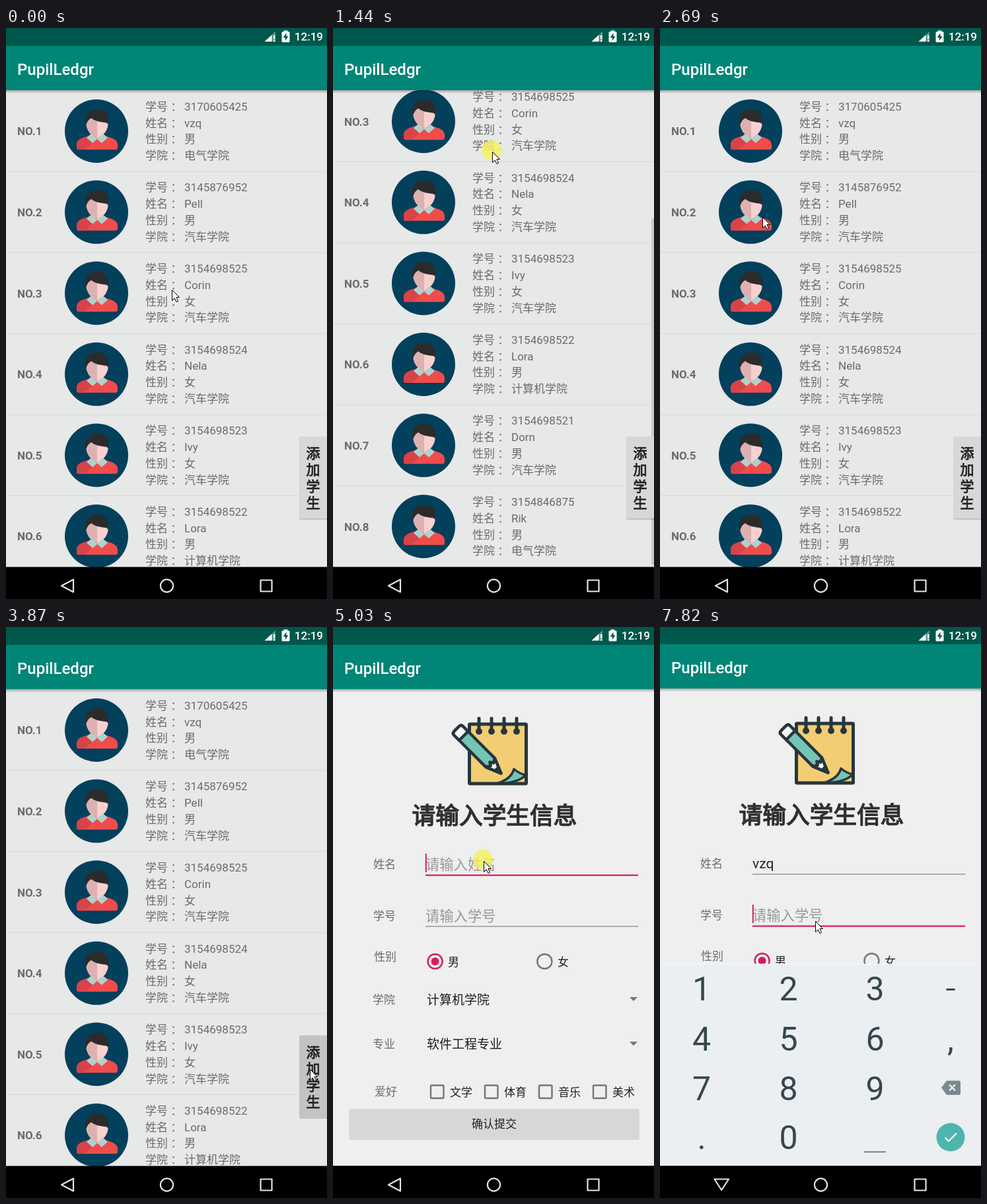
Animation of 486 by 864 pixels, one loop 8 s. Source, as an HTML page:

```html
<!DOCTYPE html>
<html lang="zh-CN">
<head>
<meta charset="utf-8">
<title>PupilLedgr</title>
<style>
html, body { margin: 0; width: 100%; height: 100%; overflow: hidden; background: #000; }
svg { display: block; width: 486px; height: 864px; }
text { font-family: Roboto, 'Noto Sans CJK SC', 'Noto Sans CJK', sans-serif; font-size: 17px; fill: #6b6b6b; white-space: pre; }
.mid { text-anchor: middle; }
.dark { fill: #212121; }
.title { font-size: 35.7px; fill: #303030; stroke: #303030; stroke-width: 1.5px; text-anchor: middle; }
.side { font-size: 21px; fill: #212121; stroke: #212121; stroke-width: .8px; text-anchor: middle; }
.hint { font-size: 21.3px; fill: #979797; }
.typed { font-size: 21px; fill: #212121; }
.spin { font-size: 19px; fill: #1c1c1c; }
.key { font-size: 29.5px; fill: #37474f; text-anchor: middle; }
.num { font-size: 50px; fill: #37474f; text-anchor: middle; }
.sup { font-size: 14px; font-weight: 700; fill: #74838a; text-anchor: middle; }
.sug { font-size: 20px; fill: #37474f; text-anchor: middle; }
#list, #thumb, #form, #paper, #board, #pointer { animation: 8s linear infinite; }
#list { animation-name: scroll; }
#thumb { animation-name: thumb; }
#form { animation-name: fade, rise; }
#paper { animation-name: paper; }
#board { animation-name: board; }
#pointer { animation-name: pointer; }

@keyframes scroll {
  0%, 6.5% { transform: translateY(0); }
  11.25%, 11.8% { transform: translateY(-145px); }
  13.9%, 19% { transform: translateY(-260px); }
  20.8%, 100% { transform: translateY(0); }
}
@keyframes thumb {
  0%, 6.2% { transform: translateY(0); opacity: 0; }
  6.5% { transform: translateY(0); opacity: 1; }
  11.25%, 11.8% { transform: translateY(107px); }
  13.9%, 19% { transform: translateY(191px); }
  20.8% { transform: translateY(0); opacity: 1; }
  23%, 100% { transform: translateY(0); opacity: 0; }
}
@keyframes fade {
  0%, 50.7% { opacity: 0; }
  53.3%, 100% { opacity: 1; }
}
@keyframes rise {
  0%, 50.7% { transform: translateY(60px); animation-timing-function: cubic-bezier(.333, .667, .667, 1); }
  55.1%, 95.7% { transform: translateY(0); }
  96.5%, 100% { transform: translateY(-1px); }
}
@keyframes paper {
  0%, 54% { fill: #e8e9e8; }
  57%, 100% { fill: #eeefee; }
}
@keyframes board {
  0%, 64% { opacity: 0; transform: translateY(60px); animation-timing-function: ease-out; }
  67.5%, 95.9% { opacity: 1; transform: translateY(0); }
  96%, 100% { opacity: 0; transform: translateY(0); }
}
@keyframes pointer {
  0%, 2.5% { transform: translate(251px, 396px); }
  6.25% { transform: translate(236px, 512px); }
  11.25%, 11.8% { transform: translate(228px, 361px); }
  14.4% { transform: translate(234px, 240px); }
  18%, 19% { transform: translate(241px, 187px); }
  20.5% { transform: translate(262px, 420px); }
  22.9% { transform: translate(280px, 620px); }
  24.4% { transform: translate(284px, 636px); }
  27.5% { transform: translate(230px, 330px); }
  30% { transform: translate(120px, 145px); }
  31.5% { transform: translate(36px, 210px); }
  33.6%, 34.7% { transform: translate(155px, 286px); }
  36.25% { transform: translate(90px, 118px); }
  38.1% { transform: translate(3px, 240px); }
  41.25% { transform: translate(240px, 520px); }
  43.75% { transform: translate(455px, 664px); }
  45.25%, 55.5% { transform: translate(460px, 669px); }
  59.75%, 91.7% { transform: translate(228px, 354px); }
  94.3%, 100% { transform: translate(235px, 445px); }
}
</style>
</head>
<body>
<svg id="stage" viewBox="0 0 486 864"></svg>
<script>
const LOOP = 8000, ACCENT = '#d81b60', INK = '#27363e', TEAL = '#74c5b3';

const text = (x, y, s, cls = '', more = '') => `<text x="${x}" y="${y}" class="${cls}" ${more}>${s}</text>`;
const rect = (x, y, w, h, fill, more = '') => `<rect x="${x}" y="${y}" width="${w}" height="${h}" fill="${fill}" ${more}/>`;
const path = (d, fill, more = '') => `<path d="${d}" fill="${fill}" ${more}/>`;
const disc = (x, y, r, fill, more = '') => `<circle cx="${x}" cy="${y}" r="${r}" fill="${fill}" ${more}/>`;
const line = (w, color) => `stroke="${color}" stroke-width="${w}" stroke-linejoin="round"`;
// Visible only during the given "from-to" spans in ms
const during = (spans, body) => `<g data-on="${spans}">${body}</g>`;

const header = () =>
  rect(0, 94, 486, 5, 'url(#shade)') +
  rect(0, 0, 486, 27.5, '#00574b') +
  rect(0, 27, 486, 67, '#008577') +
  text(17, 70.5, 'PupilLedgr', '', 'style="font-size:24px;font-weight:500;fill:#fff"');

const avatar =
  disc(0, 0, 48, '#02405c') +
  path('M-30 25V21C-30 13-24 11-12 7H13C25 11 32 13 32 21V25Q32 28 29 28H-27Q-30 28-30 25Z', '#f04c4c') +
  path('M-30 25V21C-30 13-24 11-12 7L-6 18-18 28H-27Q-30 28-30 25Z', '#d8434a') +
  path('M-8-2H1V12L-8 5Z', '#d9abab') + path('M1-2H10V5L1 12Z', '#f3c6c6') +
  path('M-16-14L1-26V9C-9 8-16-2-16-14Z', '#ddb1b1') +
  path('M18-14L1-26V9C11 8 18-2 18-14Z', '#f8d0d0') +
  path('M-15 10L-8 4 1 12-6 18ZM17 10L10 4 1 12 8 18Z', '#b0d2cc') +
  path('M-16-9C-20-24-11-33 2-33C15-33 20-23 17.500-8C18-12 15-13 12-13C4-14-4-16-8-20C-12-18-14-14-16-9Z', '#2b2b2b');

const CAR = '汽车学院', POWER = '电气学院', CODE = '计算机学院';
const people = [
  ['3170605425', 'vzq', '男', POWER], ['3145876952', 'Pell', '男', CAR],
  ['3154698525', 'Corin', '女', CAR], ['3154698524', 'Nela', '女', CAR],
  ['3154698523', 'Ivy', '女', CAR], ['3154698522', 'Lora', '男', CODE],
  ['3154698521', 'Dorn', '男', CAR], ['3154846875', 'Rik', '男', POWER]
];
const fields = ['学号', '姓名', '性别', '学院'];
const row = (person, i) => `<g transform="translate(0 ${94.3 + 122.6 * i})">` +
  text(17, 68, 'NO.' + (i + 1), '', 'font-weight="700"') +
  `<g transform="translate(137 61.700)">${avatar}</g>` +
  fields.map((f, k) => text(211, 30.5 + 24.8 * k, f + ' ：') + text(270, 30.5 + 24.8 * k, person[k])).join('') +
  rect(0, 122.3, 486, 1, '#d6d7d7') + '</g>';

const listPage =
  rect(0, 0, 486, 864, '#e7e8e8') +
  `<g id="list">${people.map(row).join('')}</g>` +
  rect(482, 97, 4, 524, '#c6c7c7', 'id="thumb"') +
  rect(444, 619, 46, 125, '#000', 'rx="3" opacity=".16"') +
  rect(444, 618, 46, 124, '#d6d7d7', 'rx="2"') +
  during('3720-3900', rect(444, 618, 46, 124, '#c2c3c3', 'rx="2"')) +
  [...'添加学生'].map((c, i) => text(465, 651 + 25 * i, c, 'side')).join('') +
  header() + rect(0, 815.5, 486, 49, '#000');

const notepad =
  rect(206.5, 147, 86, 90, '#f2cd74', 'rx="1" ' + line(5, INK)) +
  [221, 240, 259, 278].map(x => rect(x - 2.5, 136, 5, 20, INK, 'rx="2"') + disc(x, 158, 5, INK)).join('') +
  path('M247 237C262 233 271 226 274 215C280 220 286 223 292 224C284 232 268 237 247 237Z', TEAL, line(3.5, INK)) +
  `<g transform="translate(190 157) rotate(45)" ${line(4.5, INK)}>` +
  path('M0-9.500H68L91 0 68 9.500H0Q-4 9.500-4 5V-5Q-4-9.500 0-9.500Z', TEAL) +
  path('M0-9.500H11V9.500H0Q-4 9.500-4 5V-5Q-4-9.500 0-9.500Z', '#f4f5f4') +
  path('M68-9.500L91 0 68 9.500 72 3 67 0 72-3Z', '#fff') +
  path('M82-3L91 0 82 3Z', INK) + '</g>';

const caret = (x, y) => rect(x, y, 2, 28, ACCENT);
const fieldLine = (y, on) => rect(140, on ? y - 1 : y - .6, 322, on ? 2.2 : 1.3, on ? ACCENT : '#8c8c8c');
const arrow = y => path(`M449 ${y}H461L455 ${y + 6}Z`, '#757575');

const labels = [[61, 359, '姓名'], [61, 437, '学号'], [62, 499, '性别'], [60, 564, '学院'], [60, 631, '专业'], [63, 703, '爱好']];
const formPage =
  rect(0, 0, 486, 816, '#eeefee', 'id="paper"') + notepad +
  text(244.5, 297.5, '请输入学生信息', 'title') +
  labels.map(([x, y, s]) => text(x, y + 6.4, s)).join('') +
  during('0-5960', text(140, 366.5, '请输入姓名', 'hint')) +
  during('0-7640', fieldLine(375.5, true)) + during('7640-8000', fieldLine(375)) +
  during('0-5640', caret(139.8, 343)) +
  during('5960-6430', text(140, 366, 'v', 'typed')) + during('5960-6430', caret(150, 343)) +
  during('6430-6750', text(140, 366, 'vz', 'typed')) + during('6430-6750', caret(160.5, 343)) +
  during('6750-8000', text(140, 366, 'vzq', 'typed')) + during('6750-7640', caret(172, 343)) +
  during('6110-6430', rect(140, 369, 10, 1.2, '#212121')) +
  during('6430-6750', rect(140, 369, 20, 1.2, '#212121')) +
  during('6750-7640', rect(140, 369, 32, 1.2, '#212121')) +
  text(140, 444.5, '请输入学号', 'hint') +
  during('0-7640', fieldLine(453, false)) + during('7640-8000', fieldLine(453.5, true) + caret(139.8, 421)) +
  disc(154.6, 506, 11, 'none', line(2.5, ACCENT)) + disc(154.6, 506, 6, ACCENT) + text(174, 512.5, '男', 'dark') +
  disc(320.4, 506, 11, 'none', line(2.5, '#757575')) + text(340, 512.5, '女', 'dark') +
  text(142, 571, CODE, 'spin') + arrow(560) +
  text(142, 638, '软件工程专业', 'spin') + arrow(627.5) +
  ['文学', '体育', '音乐', '美术'].map((s, i) =>
    rect(148 + 82 * i, 693.5, 19.5, 19.5, 'none', 'rx="1.500" ' + line(2.4, '#757575')) +
    text(177 + 82 * i, 710, s, 'dark')).join('') +
  rect(24.5, 731, 439, 45, '#000', 'rx="3" opacity=".1"') +
  rect(24.5, 729, 439, 45.5, '#d6d7d7', 'rx="3"') +
  text(244, 758, '确认提交', 'mid dark') +
  header() + rect(0, 815.5, 486, 90, '#000');

const erase = x => path(`M${x - 14} 697L${x - 6} 686.500H${x + 13}Q${x + 15} 686.500 ${x + 15} 688.500V706Q${x + 15} 708 ${x + 13} 708H${x - 6}Z`, '#7b898f') +
  path(`M${x - 2} 692.500L${x + 7} 701.500M${x + 7} 692.500L${x - 2} 701.500`, 'none', line(2.4, '#eceff1'));
const keys = (s, x, y) => [...s].map((c, i) => text(x + 49.1 * i, y, c, 'key')).join('');
const board =
  rect(0, 463, 486, 352.5, '#eceff1') + rect(0, 463, 486, 47, '#e4e8ea') + rect(0, 509.5, 486, 1, '#f6f8f9') +
  rect(169.5, 472, 1, 29, '#c9ced1') + rect(315.5, 472, 1, 29, '#c9ced1') +
  during('6110-6580', text(85, 494, 'l', 'sug') + text(401, 494, 'c', 'sug') + text(243, 494, 'v', 'sug') +
    [-5, 0, 5].map(d => disc(243 + d, 507, 1.3, '#7b898f')).join('')) +
  during('6580-6900', text(87, 494, 'i', 'sug') + text(243, 494, 'vz', 'sug') + text(401, 494, 'vizier', 'sug')) +
  during('6900-7680', text(87, 494, 'l', 'sug') + text(243, 494, 'vzq', 'sug')) +
  keys('qwertyuiop', 22, 557) + keys('asdfghjkl', 47, 632.5) + keys('zxcvbnm', 96, 707.5) +
  [...'1234567890'].map((c, i) => text(37.5 + 49.2 * i, 531, c, 'sup')).join('') +
  path('M32 685.500L46 699H39V708H25V699H18Z', '#7b898f') + rect(20, 721, 21, 2, '#7b898f') + erase(455) +
  text(13, 779, '?123', '', 'style="font-size:19px;fill:#6d7b82"') +
  text(96, 782, ',', 'key') + text(391, 782, '.', 'key') +
  rect(124.5, 758, 238, 28.5, '#d0d5d8', 'rx="4"') +
  disc(452.5, 772, 21.5, '#4db6ac') + path('M449.500 766.500L455.500 772 449.500 777.500', 'none', line(2.4, '#fff'));

const cols = [63, 194.5, 325.5], lines = [565.2, 640.7, 715.5, 790];
const pad =
  rect(0, 510, 486, 305.5, '#eceff1') + rect(0, 509.5, 486, 1, '#f6f8f9') +
  [...'123456789'].map((c, i) => text(cols[i % 3], lines[i / 3 | 0], c, 'num')).join('') +
  text(63, 790, '.', 'num') + text(194.5, 790, '0', 'num') + rect(309, 793.5, 33, 1.6, '#5c6a71') +
  rect(433.5, 547, 13, 3, '#37474f') + text(440, 640.7, ',', 'num') + erase(440) +
  disc(440, 772, 21.5, '#4db6ac') + path('M431.500 772.500L437 778 449 766', 'none', line(2.4, '#fff'));

const white = line(2.2, '#e4e4e4');
const systemIcons =
  path('M408 5V20.500H391.500Z', '#fff', 'opacity=".35"') + path('M402.500 10.500V20.500H391.500Z', '#fff') +
  rect(405, 11, 2.4, 6, '#fff') + rect(405, 18.3, 2.4, 2.4, '#fff') +
  rect(417.5, 5.5, 12, 16, '#fff', 'rx="1.500"') + rect(420.7, 3.7, 5.6, 3, '#fff') +
  path('M424.500 7.500L419.500 14.500H422.800V19.500L427.500 12.500H424.500Z', '#00574b') +
  text(480, 19.3, '12:19', '', 'text-anchor="end" style="fill:#fff;font-weight:500"') +
  during('0-5200', path('M84 844L102 834.500V853.500Z', 'none', white)) +
  during('5200-8000', path('M82.500 835.500H104L93.200 852Z', 'none', white)) +
  disc(243.5, 844, 9.6, 'none', white) + rect(385.5, 835.5, 17, 17, 'none', white);

const pointer = '<g id="pointer">' +
  during('510-1850 3700-3860 4900-5060 7560-7700', disc(-1, -2, 15, '#f6f05e', 'opacity=".82"')) +
  path('M.5 .5V16.500L4.300 13 7 18.500 9.500 17.500 7 11.500H11.500Z', '#fff', 'stroke="#000"') + '</g>';

stage.innerHTML =
  '<defs><linearGradient id="shade" x2="0" y2="1"><stop stop-opacity=".3"/><stop offset="1" stop-opacity="0"/></linearGradient></defs>' +
  listPage + `<g id="form">${formPage}</g><g id="board">${board}</g>` + during('7680-8000', pad) +
  during('4480-8000', rect(0, 815.5, 486, 49, '#000')) + systemIcons + pointer;

// Turn each list of time spans into on/off keyframes
const pct = ms => ms / LOOP * 100 + '%';
const sheet = document.createElement('style');
stage.querySelectorAll('[data-on]').forEach((el, i) => {
  const steps = el.dataset.on.split(' ').map(span => {
    const [from, to] = span.split('-');
    return `${pct(from)}{opacity:1}` + `${pct(to)}{opacity:0}`;
  }).join('');
  sheet.textContent += `@keyframes on${i}{0%{opacity:0}${steps}100%{opacity:0}}`;
  el.style.animation = `on${i} ${LOOP}ms step-end infinite`;
});
document.head.append(sheet);
</script>
</body>
</html>
```
